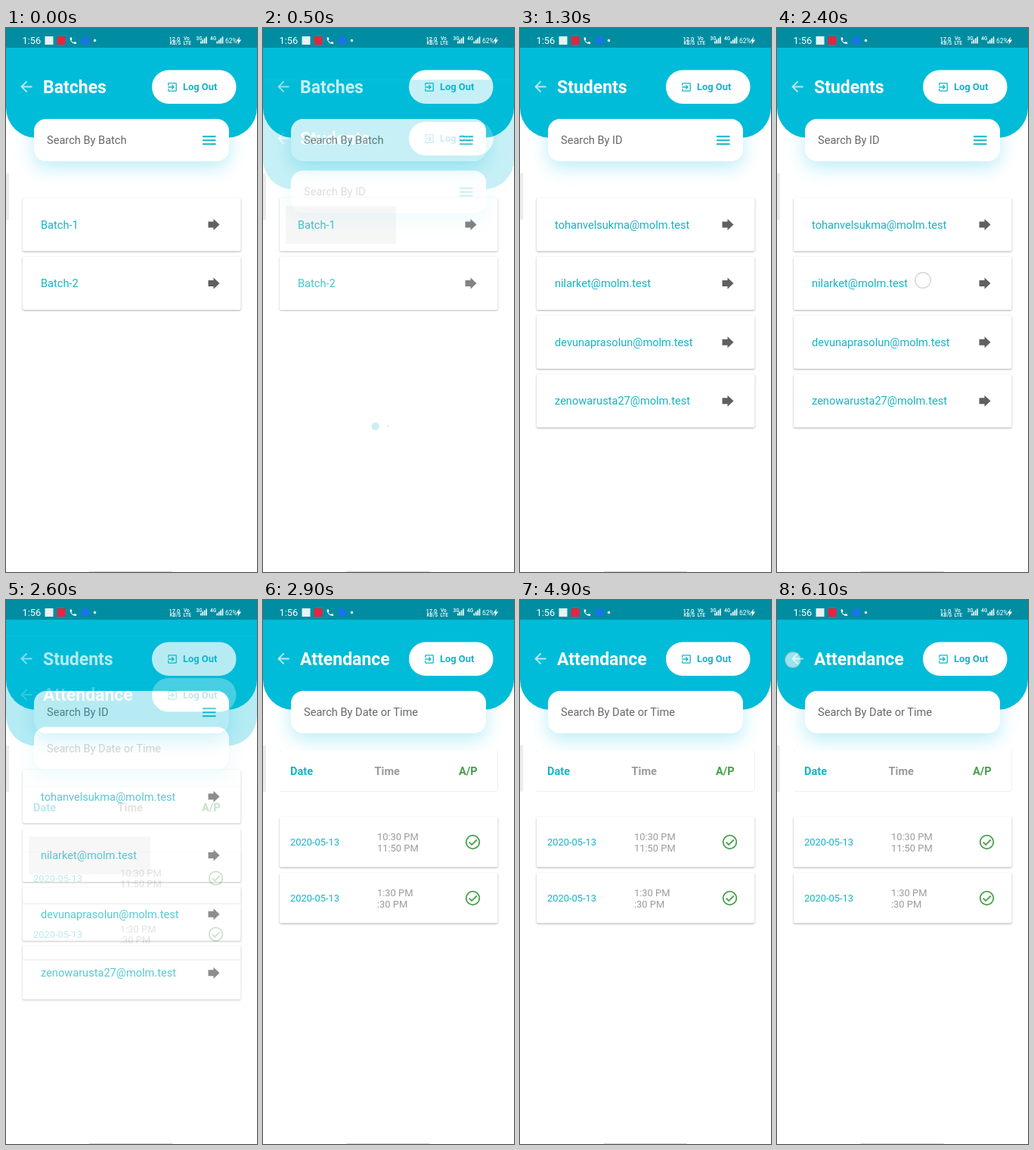
Recreate the animation shown at these times as an HTML page. Size 332x718 px, loop 6.2 s.

```html
<!DOCTYPE html>
<html lang="en">
<head>
<meta charset="utf-8">
<title>Attendance app</title>
<style>
  html, body { margin: 0; width: 100%; height: 100%; overflow: hidden; background: #fff; }
  svg { display: block; width: 332px; height: 718px; font-family: Roboto, sans-serif; font-size: 14.6px; }
  .bold { font-weight: 700; }
  .title { font-size: 23px; fill: #fff; }
  .small { font-size: 12.9px; }
  .cyan { fill: #14b4c6; }
  .gray { fill: #9b9b9b; }
  .green { fill: #43a047; }
  .hint { fill: #686868; }
  .card { fill: #fff; filter: drop-shadow(0 1.5px 1px rgba(0, 0, 0, .32)); }
  .flat { fill: #fff; filter: drop-shadow(0 .6px .6px rgba(0, 0, 0, .26)); }
  .search { fill: #fff; filter: drop-shadow(0 8px 12px rgba(0, 188, 225, .27)); }
  .status { fill: #fff; }
  .tiny { font-size: 6.5px; font-weight: 500; }
</style>
</head>
<body>
<svg id="stage" viewBox="0 0 332 718"></svg>
<script>
const LOOP = 6200, OPEN_STUDENTS = 380, STUDENTS_LOADED = 1250, OPEN_ATTENDANCE = 2460;
const stage = document.getElementById('stage');

const text = (x, y, str, cls = '') => `<text x="${x}" y="${y}" class="${cls}">${str}</text>`;
const rect = (x, y, w, h, attrs = '') => `<rect x="${x}" y="${y}" width="${w}" height="${h}" ${attrs}/>`;

const page = (id, title, hint, menu, body) => `
  <g id="${id}">
    ${rect(0, 0, 332, 718, 'fill="#fff"')}
    <path d="M0 0H332V105A40 40 0 0 1 292 145H40A40 40 0 0 1 0 105Z" fill="#00bcd8"/>
    <path transform="translate(15.4 65.9) scale(.96)" fill="#fff" opacity=".72"
      d="M20 11H7.83l5.59-5.59L12 4l-8 8 8 8 1.41-1.41L7.83 13H20z"/>
    ${text(49, 85.7, title, 'bold title')}
    ${rect(193, 55.5, 111.5, 44.5, 'rx="22" fill="#fff"')}
    <path transform="translate(212.2 70.2) scale(.65)" class="cyan"
      d="M10.1 15.6L11.5 17l5-5-5-5-1.4 1.4L12.7 11H3v2h9.7zM19 3H5a2 2 0 0 0-2 2v4h2V5h14v14H5v-4H3v4a2 2 0 0 0 2 2h14a2 2 0 0 0 2-2V5a2 2 0 0 0-2-2z"/>
    ${text(234, 82.3, 'Log Out', 'bold small cyan')}
    ${rect(37, 120, 258, 56, 'rx="16" class="search"')}
    ${text(54, 153.3, hint, 'hint')}
    ${menu ? '<path d="M260 143.3h17.5m-17.5 5h17.5m-17.5 5h17.5" stroke="#14b4c6" stroke-width="2"/>' : ''}
    ${body}
  </g>`;

const listRow = (label, i) => `
  <g transform="translate(0 ${i * 77.6})">
    ${rect(22, 224, 288.5, 70.5, 'rx="2" class="card"')}
    ${text(46, 264.5, label, 'cyan')}
    <path d="M267.5 255.5H274.5V252L282.5 259.5L274.5 267V263.5H267.5Z" fill="#606060"/>
  </g>`;

const timeRow = (from, to, i) => `
  <g transform="translate(0 ${i * 74})">
    ${rect(22, 286, 288.5, 66.5, 'rx="2" class="card"')}
    ${text(36, 324, '2020-05-13', 'small cyan')}
    ${text(151, 317, from, 'small gray')}
    ${text(151, 331.6, to, 'small gray')}
    <g fill="none" stroke="#43a047" stroke-width="1.8">
      <circle cx="277.5" cy="319.5" r="8.8"/><path d="M272.7 319.7l3.4 3.4 6.6-6.6"/>
    </g>
  </g>`;

const press = (id, y, w) => rect(30, y, w, 50, `id="${id}" rx="2" opacity="0"`);
const bars = x => [3, 5, 7, 9].map((h, i) => rect(x + i * 2.4, 20.5 - h, 1.6, h)).join('');

const statusBar = `
  ${rect(0, 0, 332, 26, 'opacity=".25"')}
  <g class="status">
    ${text(21.5, 20.8, '1:56', 'small')}
    ${rect(51.5, 11, 11, 11, 'fill="#e8f3f4"')}
    ${rect(67.5, 11, 11, 11, 'rx="1" fill="#e6243f"')}
    <path transform="translate(83 11) scale(.48)"
      d="M6.6 10.8a15 15 0 0 0 6.6 6.6l2.2-2.2a1 1 0 0 1 1-.2 11 11 0 0 0 3.6.6 1 1 0 0 1 1 1V20a1 1 0 0 1-1 1A17 17 0 0 1 3 4a1 1 0 0 1 1-1h3.500a1 1 0 0 1 1 1 11 11 0 0 0 .6 3.600 1 1 0 0 1-.3 1z"/>
    <circle cx="105" cy="16.500" r="5.500" fill="#1a73e8"/>
    <circle cx="117.500" cy="16.500" r="1.700"/>
    <text id="speed" x="215.500" y="16.600" style="font-size:7.500px;font-weight:500"></text>
    ${text(216.5, 22.3, 'KB/S', 'tiny')}
    ${text(235, 16, 'Vo', 'tiny')}${text(234.5, 22, 'LTE', 'tiny')}
    ${text(251.5, 16.3, '3G', 'tiny')}${bars(257)}
    ${text(270, 16.3, '4G', 'tiny')}${bars(278.5)}
    <text x="290" y="20" style="font-size:8.500px">62%</text>
    <path d="M309 11.500L304.500 17.500H307.300L306.300 22L311.200 15.600H308.200Z"/>
  </g>`;

const students = ['tohanvelsukma', 'nilarket', 'devunaprasolun', 'zenowarusta27'];

stage.innerHTML =
  page('batches', 'Batches', 'Search By Batch', true,
    ['Batch-1', 'Batch-2'].map(listRow).join('') + press('pressBatch', 235, 146)) +
  page('students', 'Students', 'Search By ID', true,
    `<g id="list">${students.map(s => s + '@molm.test').map(listRow).join('')}</g>` +
    `<g id="loader" fill="#0fb8cc">${[148.5, 165.8, 183].map(x => `<circle cx="${x}" cy="457.5"/>`).join('')}</g>` +
    press('pressStudent', 312, 161)) +
  page('attendance', 'Attendance', 'Search By Date or Time', false,
    rect(22, 199, 288.5, 53.5, 'rx="2" class="flat"') +
    text(36, 231, 'Date', 'bold cyan') + text(147.5, 231, 'Time', 'bold gray') +
    text(259, 231, 'A/P', 'bold green') +
    timeRow('10:30 PM', '11:50 PM', 0) + timeRow('1:30 PM', ':30 PM', 1)) +
  rect(0, 192, 4, 61, 'fill="#ececec"') +
  rect(110.5, 716.8, 110, 1.2, 'fill="#d8d8d8"') +
  statusBar +
  '<circle id="touch" r="10.2" fill="#fff" fill-opacity=".6" stroke="#bbb" stroke-opacity=".6" stroke-width="1.4"/>';

const $ = id => document.getElementById(id);
const clamp = v => Math.min(1, Math.max(0, v));
const show = (id, on) => $(id).setAttribute('visibility', on ? 'visible' : 'hidden');

function bezier(x1, y1, x2, y2) {
  const at = (a, b, s) => 3 * a * s * (1 - s) ** 2 + 3 * b * s * s * (1 - s) + s ** 3;
  return x => {
    let lo = 0, hi = 1;
    for (let i = 0; i < 24; i++) {
      const mid = (lo + hi) / 2;
      if (at(x1, x2, mid) < x) lo = mid; else hi = mid;
    }
    return at(y1, y2, hi);
  };
}
const slide = bezier(.4, 0, .2, 1), fade = bezier(.42, 0, 1, 1);

// New pages rise a quarter of the stage while fading in.
function openPage(id, t, start) {
  const p = clamp((t - start) / 300);
  $(id).setAttribute('display', p > 0 ? 'inline' : 'none');
  $(id).setAttribute('opacity', p < 1 ? fade(p) : 1);
  $(id).setAttribute('transform', `translate(0 ${p < 1 ? 179.5 * (1 - slide(p)) : 0})`);
}

const taps = [[290, 390, 72, 256], [2300, 2450, 193, 333], [5960, LOOP, 21, 79]];

function draw(t) {
  openPage('students', t, OPEN_STUDENTS);
  openPage('attendance', t, OPEN_ATTENDANCE);

  const loaded = t >= STUDENTS_LOADED;
  $('list').setAttribute('display', loaded ? 'inline' : 'none');
  $('loader').setAttribute('display', loaded ? 'none' : 'inline');
  const turn = (t - OPEN_STUDENTS) / 1400;
  [...$('loader').children].forEach((dot, i) =>
    dot.setAttribute('r', 3.3 * (1 + Math.sin((turn - i * .2) * 2 * Math.PI))));

  $('pressBatch').setAttribute('opacity', .045 * clamp((t - 340) / 100));
  $('pressStudent').setAttribute('opacity', .045 * clamp((t - 2410) / 100));

  const tap = taps.find(([from, to]) => t >= from && t < to);
  show('touch', tap);
  if (tap) $('touch').setAttribute('transform', `translate(${tap[2]} ${tap[3]})`);

  $('speed').textContent = t < 1600 ? '12.0' : t < 5600 ? '17.0' : '11.0';
}

function tick() {
  draw(performance.now() % LOOP);
  requestAnimationFrame(tick);
}
tick();
</script>
</body>
</html>
```
